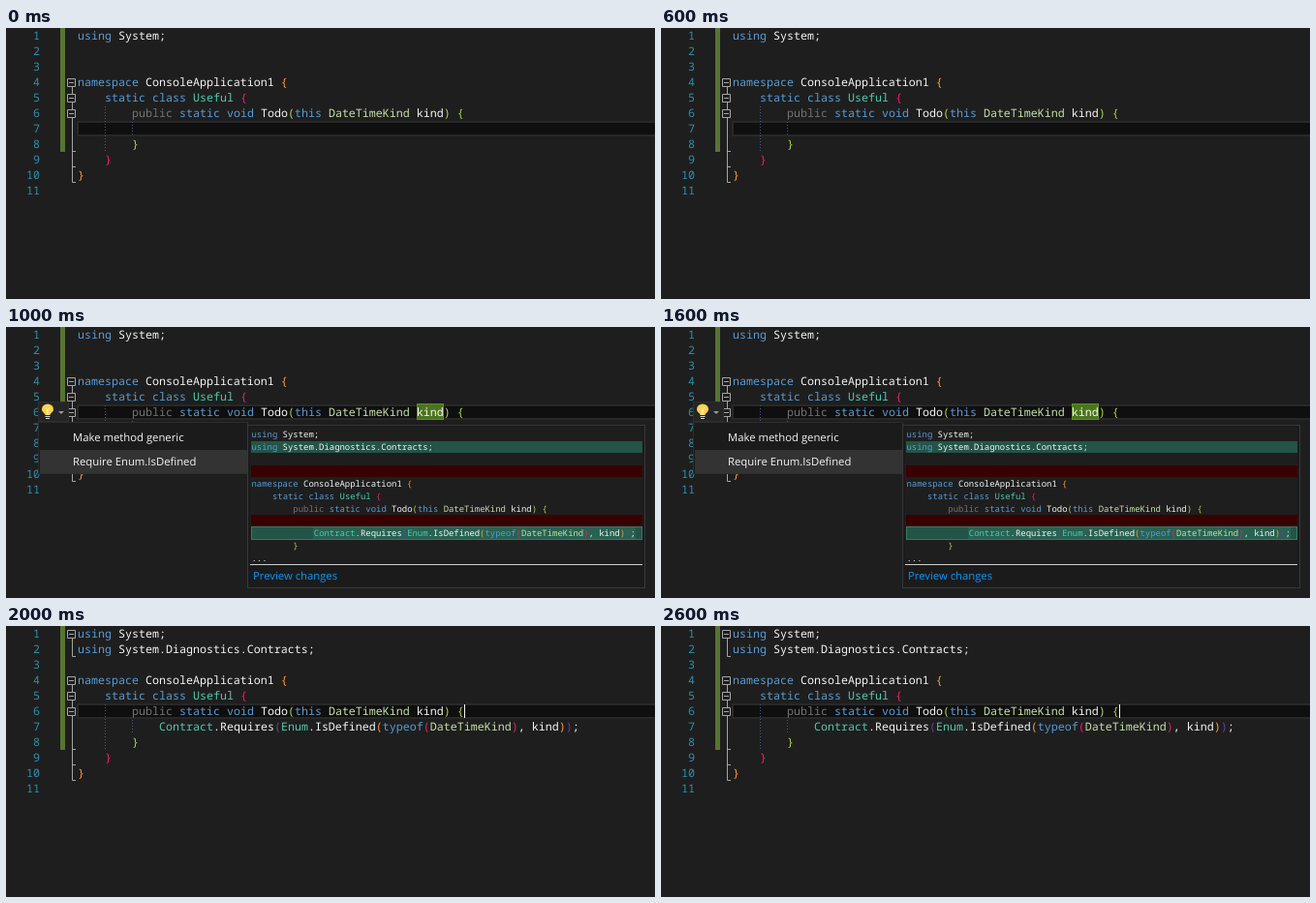
An HTML page for the animation above (3 s loop, 670 by 280 pixels).

```html
<!DOCTYPE html>
<html lang="en">
<head>
<meta charset="utf-8">
<title>Code fix</title>
<style>
html, body { margin: 0; width: 100%; height: 100%; overflow: hidden; background: #1e1e1e; }
svg { display: block; width: 670px; height: 280px; }
text { white-space: pre; text-rendering: geometricPrecision; fill: #f4f4f4; }
.code { font-family: "Noto Sans Mono", "DejaVu Sans Mono", monospace; font-weight: 500; }
.ui { font: 11.3px "Open Sans", "Noto Sans", sans-serif; }
.link { fill: #0097fb; }
.keyword { fill: #569cd6; }
.dim { fill: #737373; }
.type { fill: #4ec9b0; }
.enum { fill: #c3e0a6; }
.number { fill: #2b91af; text-anchor: end; font-weight: 400; }
.fold { fill: none; stroke: #a5a5a5; }
.guide { stroke: #4a5590; stroke-dasharray: 1 2; }
.row { fill: #0f0f0f; stroke: #282828; stroke-width: 2; }
.added { fill: #235448; }
.removed { fill: #390000; }

/* Three one-second scenes; .edit spans the last two. */
.before, .menu, .after, .edit { visibility: hidden; animation: 3s step-end infinite; }
.before { animation-name: before; }
.menu { animation-name: menu; }
.after { animation-name: after; }
.edit { animation-name: edit; }
@keyframes before { 0% { visibility: visible } 33.3333%, 100% { visibility: hidden } }
@keyframes menu { 0% { visibility: hidden } 33.3333% { visibility: visible } 66.6667%, 100% { visibility: hidden } }
@keyframes after { 0% { visibility: hidden } 66.6667%, 100% { visibility: visible } }
@keyframes edit { 0% { visibility: hidden } 33.3333%, 100% { visibility: visible } }
</style>
</head>
<body>
<svg viewBox="0 0 670 280">
  <rect width="670" height="280" fill="#1e1e1e"/>
  <rect class="row before" x="74" y="97" width="600" height="14"/>
  <rect class="row edit" x="74" y="81" width="600" height="14"/>
  <rect x="56" width="5" height="128" fill="#577430"/>
  <path class="guide" d="M102.5 81V128M130.5 97V112"/>
  <path class="fold" d="M68.5 61V159.5H72M68.5 127.5H72M68.5 143.5H72"/>
  <path class="fold after" d="M68.5 12V31.5H72"/>
  <g id="boxes"></g>
  <rect class="menu" x="424.5" y="79.5" width="27" height="16" fill="#4b751c" stroke="#5f8c2a"/>
  <g id="editor"></g>
  <g id="result" class="after"></g>
  <path class="after" d="M473.5 81V95" stroke="#f4f4f4"/>

  <g class="menu">
    <rect x="33.5" y="77.5" width="31" height="20" fill="#252526" stroke="#2d2d30"/>
    <path d="M40.5 91C40.5 89 37 88 37 85A6 5.500 0 0 1 49 85C49 88 45.500 89 45.500 91Z" fill="#ffd34d"/>
    <path d="M41.500 84L43 87L44.500 84M43 87V91" fill="none" stroke="#fff4c4"/>
    <path d="M40.500 92.500H45.500M41 94.500H45" stroke="#d8d8d8"/>
    <path d="M54 87H60L57 90Z" fill="#999"/>

    <rect x="33.5" y="98.5" width="216" height="53" fill="#1b1b1c" stroke="#2d2d30"/>
    <rect x="35" y="127" width="214" height="24" fill="#333334"/>
    <text class="ui" x="69" y="118">Make method generic</text>
    <text class="ui" x="69" y="143">Require Enum.IsDefined</text>

    <rect x="249.5" y="101.5" width="410" height="168" fill="#1b1b1c" stroke="#38383c"/>
    <rect x="252" y="104" width="405" height="141" fill="#1e1e1e"/>
    <rect class="added" x="253" y="118" width="404" height="12"/>
    <rect class="removed" x="253" y="143" width="404" height="12"/>
    <rect class="removed" x="253" y="194" width="404" height="12"/>
    <rect class="added" x="253.5" y="206.5" width="403" height="13" stroke="#347a68"/>
    <rect x="317" y="207" width="333" height="12" fill="#286252"/>
    <path d="M252 245.500H657" stroke="#d0d0d0"/>
    <g id="preview"></g>
    <text class="ui link" x="255" y="261">Preview changes</text>
  </g>
</svg>
<script>
const NS = "http://www.w3.org/2000/svg";
const $ = id => document.getElementById(id);
const bracketColors = ["#ff9a30", "#f51a72", "#a8d848", "#6a40a0"];
const tokens = /\b(using|namespace|static|class|void|this|typeof)\b|\b(public)\b|\b(Useful|Contract|Enum)\b|\b(DateTimeKind)\b|([({])|([)}])/g;
const kinds = ["keyword", "dim", "type", "enum"];

function add(parent, tag, attrs, content = "") {
  const el = document.createElementNS(NS, tag);
  for (const key in attrs) el.setAttribute(key, attrs[key]);
  el.innerHTML = content;
  parent.append(el);
}

// Colours each token; bracket colours cycle with nesting depth.
function highlight(source, depth = 0) {
  return source.replace(tokens, (token, ...groups) => {
    const kind = groups.findIndex(Boolean);
    if (kind < 4) return `<tspan class="${kinds[kind]}">${token}</tspan>`;
    const level = kind === 4 ? depth++ : --depth;
    return `<tspan style="fill:${bracketColors[level % 4]}">${token}</tspan>`;
  });
}

function print(parent, source, x, y, step, size, depth) {
  highlight(source, depth).split("\n").forEach((line, i) => {
    const indent = line.match(/^ */)[0].length;
    add(parent, "text", {
      class: "code", x: x + indent * size * 0.6, y: y + i * step, "font-size": size
    }, line.slice(indent));
  });
}

const size = 7 / 0.6;
const open = `namespace ConsoleApplication1 {
    static class Useful {
        public static void Todo(this DateTimeKind kind) {`;
const check = "            Contract.Requires(Enum.IsDefined(typeof(DateTimeKind), kind));";
const imported = "using System.Diagnostics.Contracts;";

print($("editor"), `using System;\n\n\n${open}\n\n        }\n    }\n}`, 74, 12, 16, size);
print($("result"), imported, 74, 28, 16, size);
print($("result"), check, 74, 108, 16, size, 3);
print($("preview"), `using System;\n${imported}\n\n\n${open}\n\n${check}\n        }\n...`,
  253.5, 114, 12.78, 8.93);

for (let n = 1; n <= 11; n++) {
  add($("editor"), "text", { class: "code number", x: 35, y: n * 16 - 4, "font-size": size }, n);
}
for (const n of [1, 4, 5, 6]) {
  const y = n * 16 - 8;
  add($("boxes"), "path", {
    class: n === 1 ? "fold after" : "fold",
    style: "fill:#1e1e1e",
    d: `M63.5 ${y - 3.5}h8v8h-8ZM65 ${y + 0.5}h5`
  });
}
</script>
</body>
</html>
```
